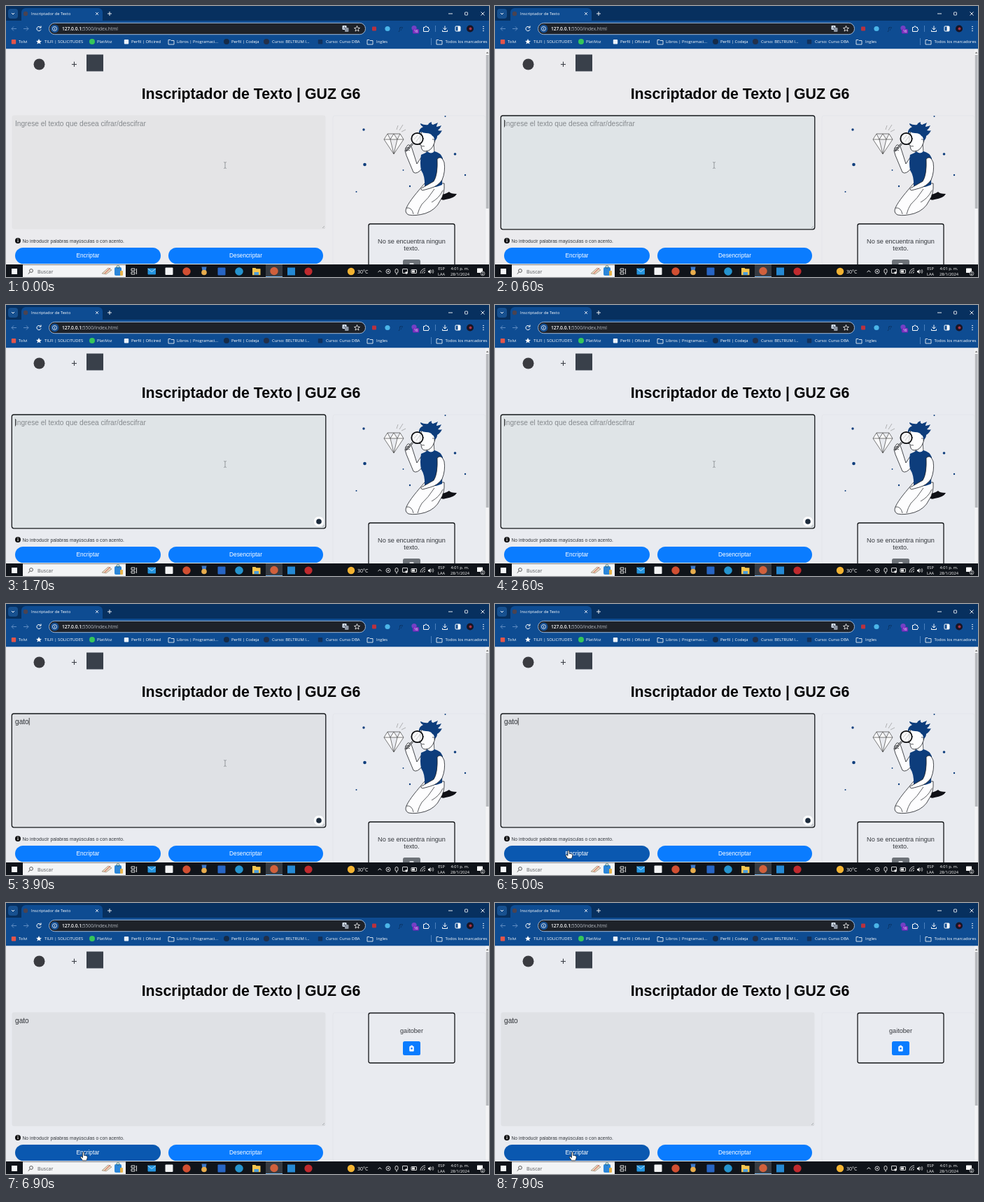
An HTML page with a canvas for the animation above (8 s loop, 690 px wide and 388 px high).

```html
<!DOCTYPE html>
<html lang="es">
<head>
<meta charset="utf-8">
<title>Inscriptador de Texto</title>
<style>
html, body { margin: 0; width: 100%; height: 100%; overflow: hidden; background: #e9ebf0; }
canvas { display: block; width: 690px; height: 388px; }
</style>
</head>
<body>
<canvas id="stage"></canvas>
<script>
const W = 690, H = 388, LOOP = 8000;
const SANS = '"Liberation Sans", Arial, sans-serif';
const UI = '"Open Sans", "Noto Sans", sans-serif';
const NAVY = '#0d3d7c', INK = '#1b1d22';

// Times of the user's actions, in ms
const FOCUS = 300, HELPER = 1000, LAST_KEY = 3500, CLICK = 6700;
const KEYS = [2900, 3100, 3300, LAST_KEY];

const canvas = document.getElementById('stage');
const ctx = canvas.getContext('2d');
const dpr = window.devicePixelRatio || 1;
canvas.width = W * dpr;
canvas.height = H * dpr;

function rect(x, y, w, h, fill, r = 0, stroke, lw = 1) {
  ctx.beginPath();
  ctx.roundRect(x, y, w, h, r);
  if (fill) { ctx.fillStyle = fill; ctx.fill(); }
  if (stroke) { ctx.strokeStyle = stroke; ctx.lineWidth = lw; ctx.stroke(); }
}

function dot(x, y, r, fill, stroke, lw = 1) {
  ctx.beginPath();
  ctx.arc(x, y, r, 0, Math.PI * 2);
  if (fill) { ctx.fillStyle = fill; ctx.fill(); }
  if (stroke) { ctx.strokeStyle = stroke; ctx.lineWidth = lw; ctx.stroke(); }
}

function path(d, fill, stroke, lw = 1) {
  const p = new Path2D(d);
  if (fill) { ctx.fillStyle = fill; ctx.fill(p); }
  if (stroke) { ctx.strokeStyle = stroke; ctx.lineWidth = lw; ctx.stroke(p); }
}

function iconAt(x, y, d, fill, stroke, lw) {
  ctx.save();
  ctx.translate(x, y);
  path(d, fill, stroke, lw);
  ctx.restore();
}

// Draws a line of text and returns its width
function text(s, x, y, size, color, font = SANS, align = 'left', weight = '') {
  ctx.font = `${weight} ${size}px ${font}`;
  ctx.textAlign = align;
  ctx.fillStyle = color;
  ctx.fillText(s, x, y);
  return ctx.measureText(s).width;
}

const clamp = v => Math.min(1, Math.max(0, v));
const ease = v => { v = clamp(v); return v * v * (3 - 2 * v); };
const mix = (a, b, k) => a + (b - a) * k;

const FOLDER = 'M-4-3h3l1 1h4v5.5h-8z';
const STAR = 'M0-4 1.2-1.2 4-1 1.8.8 2.5 3.6 0 2-2.5 3.6-1.8.8-4-1-1.2-1.2z';

function drawBrowser() {
  rect(0, 0, W, 22, '#07305f');
  rect(0, 21, W, 40.3, '#0e4c92');
  rect(3, 4, 14, 14, '#17508f', 4);
  iconAt(10, 11, 'M-2-1 0 1 2-1', null, '#fff', 1);
  rect(22, 3, 116, 19, '#0e4c92', [6, 6, 0, 0]);
  dot(28, 11, 3.2, '#4b4350');
  text('Inscriptador de Texto', 36, 13.2, 5.73, '#fff', UI);
  iconAt(130, 11, 'M-2-2 2 2M2-2-2 2', null, '#fff', .8);
  iconAt(148, 11, 'M-3 0H3M0-3V3', null, '#fff', .9);
  iconAt(635, 11, 'M-3 0H3', null, '#fff', .9);
  rect(655.5, 9, 4, 4, null, .5, '#fff', .8);
  iconAt(681, 11, 'M-2.5-2.5 2.5 2.5M2.5-2.5-2.5 2.5', null, '#fff', .9);

  iconAt(11, 32.5, 'M4 0H-3M0-3-3 0 0 3', null, '#5f8cc2', 1);
  iconAt(29, 32.5, 'M-4 0H3M0-3 3 0 0 3', null, '#5f8cc2', 1);
  iconAt(47, 32.5, 'M2.6-1.7A3.1 3.1 0 1 0 3 1M3-4v2.6H.4', null, '#fff', 1);
  rect(61.5, 24.3, 452, 16.4, '#1e2229', 8.2, '#9fb7d6', 1);
  dot(69.5, 32.5, 6, '#174f92');
  dot(69.5, 32.5, 3, null, '#fff', .8);
  iconAt(69.5, 32.5, 'M0-.3V1.7M0-1.7V-.9', null, '#fff', .8);
  const hostW = text('127.0.0.1:', 80, 35, 6.6, '#fff', UI, 'left', '600');
  text('5500/index.html', 80 + hostW, 35, 6.6, '#b9bec6', UI);
  rect(480.5, 28, 6, 6, '#d8e4f5', 1);
  rect(484, 31, 5.5, 6, '#8d97a5', 1);
  text('A', 483.5, 33, 5, '#1e2229', UI, 'center');
  iconAt(501.5, 32.5, STAR, null, '#fff', .8);

  rect(523, 29.5, 6, 6, '#b8323f', 1);
  dot(545, 32.5, 3.6, '#4bb5e8');
  text('f?', 564, 35, 7, '#082a52', UI, 'center', 'italic');
  dot(583, 31.5, 3.6, '#7440c4');
  rect(581, 33, 9, 6.5, '#7a2bbd', 1.5);
  text('16', 585.5, 38.3, 5, '#fff', UI, 'center');
  iconAt(600, 32.5, 'M-3.5-2h2a1.3 1.3 0 0 1 3 0h2v2a1.3 1.3 0 0 1 0 2.6v1.4h-7z', null, '#fff', 1);
  rect(613, 28, .8, 9, '#5c8dc7');
  iconAt(627, 32.5, 'M0-4V1.5M-2.5-1 0 1.5 2.5-1M-3.5 2v2h7V2', null, '#fff', 1);
  rect(642, 29, 7, 7, null, 1, '#fff', 1);
  rect(645.5, 29, 3.5, 7, '#fff');
  dot(663, 32.5, 5, '#191424');
  dot(663.5, 32.5, 2, '#a83244');
  for (const y of [29.5, 32.5, 35.5]) dot(682, y, .8, '#fff');

  const marks = [
    [11, 18, 'Tolvi', 'square', '#e3554a'], [47, 55, 'TILFI | SOLICITUDES', 'star'],
    [123, 130, 'PlatiVoz', 'circle', '#35c65a'], [172, 179, 'Perfil | Oficired', 'square', '#e8f1fb'],
    [236, 244, 'Libros | Programaci...', 'folder'], [315, 322, 'Perfil | Codeja', 'circle', '#152b48'],
    [372, 380, 'Curso: BELTRUM I...', 'circle', '#22304a'], [449, 457, 'Curso: Curso DBA', 'square', '#12315c'],
    [520, 529, 'Ingles', 'folder'], [619, 627.5, 'Todos los marcadores', 'folder']
  ];
  for (const [ix, tx, label, kind, color] of marks) {
    if (kind === 'folder') iconAt(ix, 51.5, FOLDER, null, '#fff', .8);
    else if (kind === 'star') iconAt(ix, 51, STAR, '#fff');
    else if (kind === 'circle') dot(ix, 51, 4, color);
    else rect(ix - 3.2, 48, 6.4, 6.4, color, 1);
    text(label, tx, 53.4, 5.9, '#fff', UI);
  }
  rect(607, 46, .8, 10, '#5c8dc7');
}

function drawGirl() {
  const spots = [[511, 177, 1.7], [512.5, 227, 2.3], [500.5, 266, 1], [641.5, 212, 1.8],
    [656, 242, 1.2], [627.5, 158, 1], [567.5, 235, .9], [577, 258, 1.2]];
  for (const [x, y, r] of spots) dot(x, y, r, NAVY);
  path('M558 177l2-6M562 178l5-8M565 180l6-3', null, '#888', .6);
  path('M545 183h18l5 8-14 21-14-21zM540 191h28M545 183l4 8 5-8 5 8 4-8M549 191l5 21 5-21', '#fbfbfc', '#444', .7);

  // legs and shoe
  path('M620 270q7 0 13-4 2 3 11 3-3 6-16 8-6 2-8-2z', '#101116');
  path('M598 254C588 266 577 278 572 289q-3 7 3 10 10 2 24-2 15-5 21-18 7-10 6-25z', '#fdfdfe', INK, .8);
  path('M612 262q-9 14-18 22-4 6-6 14M624 264q-5 11-16 17M572 289q8-1 10 9', null, INK, .7);
  // neck, face and hair
  path('M600 202l1 10q6 4 11-2l-1-14z', '#fdfdfe', INK, .7);
  path('M594 179q-3 8-2 14l-2 5 3 1q0 9 6 9 9 0 13-12l3-12z', '#fdfdfe', INK, .8);
  path('M590 183q-1-7 6-10-4-2-4-5 6 3 11 2 1-3 5-4-1 3 2 4 5-2 7-3-2 4-2 6 5-1 7-2-2 5-5 7 4 1 6 0-3 6-7 8 0 5-4 7 0-6-3-7-2-4-9-4-4 0-7-2z', NAVY);
  path('M594 201q2-1 4 0M594 189l3 1M609 191q4-1 3 4', null, INK, .7);
  // raised arm, shirt, resting arm
  path('M593 217l-6 9-7-22q-2-6-6-5-3 3-4 8l2 7 10 24q5 4 13-6z', '#fdfdfe', INK, .8);
  path('M593 213q8-3 9-5 5 5 10 0 9 2 12 10l-1 38q-13 6-25 2 1-14-5-23-2-10 0-22z', NAVY);
  path('M616 219q6-6 10 5 2 13-3 25-6 9-17 12l-11 3q-5-2 2-5l14-8q6-9 5-32z', '#fdfdfe', INK, .8);
  // magnifier
  path('M581 197l-10 11', null, INK, 2.6);
  path('M581 197l-10 11', null, '#fff', 1);
  dot(587.5, 190, 8.2, 'rgba(255,255,255,.7)', '#08090c', 1.8);
  path('M583 191l5-6M586 194l6-8', null, '#aaa', .6);
  path('M570 204q4-3 7 0M571 207q4-2 6 0', null, INK, .7);
}

function drawCard(done) {
  const top = done ? 157.5 : 312;
  rect(518, top, 123, done ? 71.5 : 80, '#e9ebf0', 2.5, '#15171a', 1.3);
  if (done) {
    text('gaitober', 579.5, 185.5, 9.14, '#35383d', SANS, 'center');
    rect(567, 198, 25, 20, '#0a7cff', 2.5);
    rect(576.3, 205, 6.4, 7.5, '#fff', 1);
    rect(578, 203.8, 3, 2.2, '#fff', .6);
    rect(578.3, 207, 2.4, 2.6, '#0a7cff');
  } else {
    text('No se encuentra ningun', 579.5, 340, 9.14, '#35383d', SANS, 'center');
    text('texto.', 579.5, 350.2, 9.14, '#35383d', SANS, 'center');
    rect(567, 363, 25, 20, '#6d7278', 2.5);
    rect(576.5, 368, 6, 5, '#d9dbde', 1);
  }
}

function drawButton(x, w, label, hover) {
  const c = [10, mix(124, 88, hover), mix(255, 176, hover)].map(Math.round);
  rect(x, 346, w, 23, `rgb(${c})`, 11.5);
  text(label, x + w / 2, 360.2, 8.25, '#fff', SANS, 'center');
}

function drawPage(t) {
  const focused = t >= FOCUS && t < CLICK, done = t >= CLICK;
  const typed = 'gato'.slice(0, KEYS.filter(k => t >= k).length);
  rect(0, 61, W, 309, t < HELPER ? '#ebebee' : '#e9ebf0');

  dot(47.5, 83.5, 8, '#3a3b40');
  text('+', 97.5, 87.8, 14.5, '#3a3d45', SANS, 'center');
  rect(115, 69.5, 24, 24, '#39404a');
  text('Inscriptador de Texto | GUZ G6', 350, 133, 21.35, '#050506', SANS, 'center', 'bold');

  rect(467, 157, 218, 213, null, 3, '#e1e3e8', .7);
  const fill = t < FOCUS ? '#e4e4e6' : t < KEYS[0] ? '#dfe4e7' : '#dfe1e5';
  if (focused) rect(8.3, 157, 448.5, 162.8, fill, 3, '#15181b', 1.3);
  else rect(8.5, 156.5, 448, 163, fill, 3);
  path('M455 315l-3 3M455 317.5l-1 1', null, '#85888c', .6);

  if (typed) text(typed, 13, 171.5, 10.16, '#303338');
  else text('Ingrese el texto que desea cifrar/descifrar', 13, 171.5, 10.16, '#85898d');

  if (focused) {
    const since = t - (t < KEYS[0] ? FOCUS : KEYS.filter(k => t >= k).pop());
    if (since % 1060 < 530) {
      ctx.font = `10.16px ${SANS}`;
      rect(13 + ctx.measureText(typed).width, 163, .8, 10.5, '#222');
    }
    if (t >= HELPER) {
      dot(447, 310, 7.8, '#fbfcfd', '#cfd3d8', .6);
      dot(447, 310, 3.8, '#1c2b3c');
    }
  }

  dot(17, 336, 4, '#08090b');
  rect(16.5, 335.2, 1.1, 3, '#fff');
  dot(17, 333.8, .7, '#fff');
  text('No introducir palabras mayúsculas o con acento.', 23.5, 338.6, 6.73, '#34383d');
  drawButton(13, 208, 'Encriptar', ease((t - 4780) / 150));
  drawButton(232, 221, 'Desencriptar', 0);

  if (!done) drawGirl();
  drawCard(done);

  rect(685, 61, 5, 309, '#f2f2f4');
  rect(685.7, 70, 3.8, 220, '#b6b8bc');
  path('M685.8 68l1.8-2.5 1.8 2.5z', '#777');
}

function drawTaskbar() {
  rect(0, 370, W, 18, '#10141a');
  rect(8, 376, 8, 8, '#f5f7f9');
  rect(24, 370.5, 147, 17.5, '#f3f4f5');
  dot(36, 379, 2.4, null, '#333', .8);
  path('M34.3 381l-2.6 2.6', null, '#333', .9);
  text('Buscar', 45, 382.6, 7, '#55585c', UI);
  path('M137 383l9-8 5 3-8 6z', '#e5d3b8', '#8b7c68', .6);
  path('M141 383l8-8', null, '#d95b52', 1);
  rect(155, 374, 10, 12, '#2b86d9', 2);
  rect(158, 372, 4, 3, null, 1, '#266', .8);
  rect(163, 379, 4, 7, '#e7b44c', 1);

  path('M179 376h5v3h-5zM179 381h5v3h-5zM186.5 376v8', null, '#f2f2f2', .9);
  rect(202.5, 375.5, 11.5, 9, '#2595e0', 1);
  path('M202.5 376l5.7 4.5 5.8-4.5', null, '#d5eeff', .8);
  rect(227.5, 374.5, 11, 10.5, '#f2f3f4', 1);
  dot(258, 380, 5.7, '#d14f32');
  path('M279.5 373.5h7l-1 6h-5z', '#3c78c9');
  dot(283, 381.5, 3.8, '#e8ad4d');
  rect(302.5, 374.5, 11, 11, '#2765c4', 1);
  dot(333, 380, 5.8, '#2594cf');
  path('M352 375h4.5l1 1.2h6v9h-11.5z', '#f5c54f');
  rect(354.5, 381, 6.5, 4, '#4d9ed9');
  rect(371, 370, 24, 18, '#373c43');
  rect(371, 387, 24, 1, '#79b4e8');
  dot(383, 379.5, 5.7, '#d0603c');
  rect(402, 374.5, 11, 11, '#2589d4');
  dot(432, 380, 5.6, '#c02a2e');

  dot(493, 380, 5.2, '#f3b332');
  text('30°C', 502, 382.7, 7, '#fff', UI);
  iconAt(534, 380, 'M-2.5 1.2 0-1.3 2.5 1.2', null, '#fff', .9);
  dot(546, 380, 3, null, '#e2e5e8', .9);
  dot(546, 380, 1, '#fff');
  rect(556, 376.5, 4, 6, null, 2, '#eee', .9);
  path('M558 383v2', null, '#eee', .9);
  rect(566.5, 376.5, 7, 6, null, .5, '#eee', .9);
  dot(572, 382, 1.7, '#eee');
  rect(579, 377.5, 7.5, 5, null, .5, '#eee', .9);
  rect(580, 378.5, 4, 3, '#eee');
  path('M592 383a7 7 0 0 1 7-7M594.5 383a4.5 4.5 0 0 1 4.5-4.5M597 383a2 2 0 0 1 2-2', null, '#eee', .8);
  path('M603 379h1.5l2-2v6.5l-2-2H603z', '#eee');
  path('M608 378q1.5 2 0 4M609.7 377q2.5 3 0 6', null, '#eee', .7);
  text('ESP', 622, 377.7, 5.6, '#fff', UI, 'center');
  text('LAA', 622, 386.2, 5.6, '#fff', UI, 'center');
  text('4:01 p. m.', 648.5, 377.7, 5.7, '#fff', UI, 'center');
  text('28/1/2024', 648.5, 386.2, 5.7, '#fff', UI, 'center');
  rect(673, 375.5, 8, 6.5, '#fff', .5);
  dot(681, 383, 3, '#30343a', '#ddd', .6);
  text('2', 681, 384.8, 5, '#fff', UI, 'center');
}

function drawPointer(t) {
  const go = ease((t - 4200) / 650), settle = ease((t - 5200) / 600);
  const x = mix(mix(313, 105, go), 110.5, settle);
  const y = mix(mix(228, 353, go), 357, settle);
  if (y < 320) {
    iconAt(x, y, 'M-1.8-4.5q1.8 0 1.8 1.2v6.6q0 1.2-1.8 1.2M1.8-4.5q-1.8 0-1.8 1.2M0 3.3q0 1.2 1.8 1.2', null, '#777b80', .7);
  } else if (y < 346) {
    iconAt(x, y, 'M0 0v11l2.6-2.4 1.8 4 1.6-.8-1.8-3.8H8z', '#fff', '#111', .7);
  } else {
    iconAt(x, y, 'M-1 1q0-1.2 1-1.2T1 1v3.5q1-.7 1.8.2 1-.5 1.7.5 1.3-.2 1.3 1.3 0 3-1.6 5.2H-1L-4 7.5q-.7-1.6 1-1.4l2 1.4z', '#fff', '#111', .7);
  }
}

function frame() {
  const t = performance.now() % LOOP;
  ctx.setTransform(dpr, 0, 0, dpr, 0, 0);
  ctx.lineJoin = 'round';
  drawPage(t);
  drawBrowser();
  drawTaskbar();
  drawPointer(t);
  requestAnimationFrame(frame);
}
frame();
</script>
</body>
</html>
```
